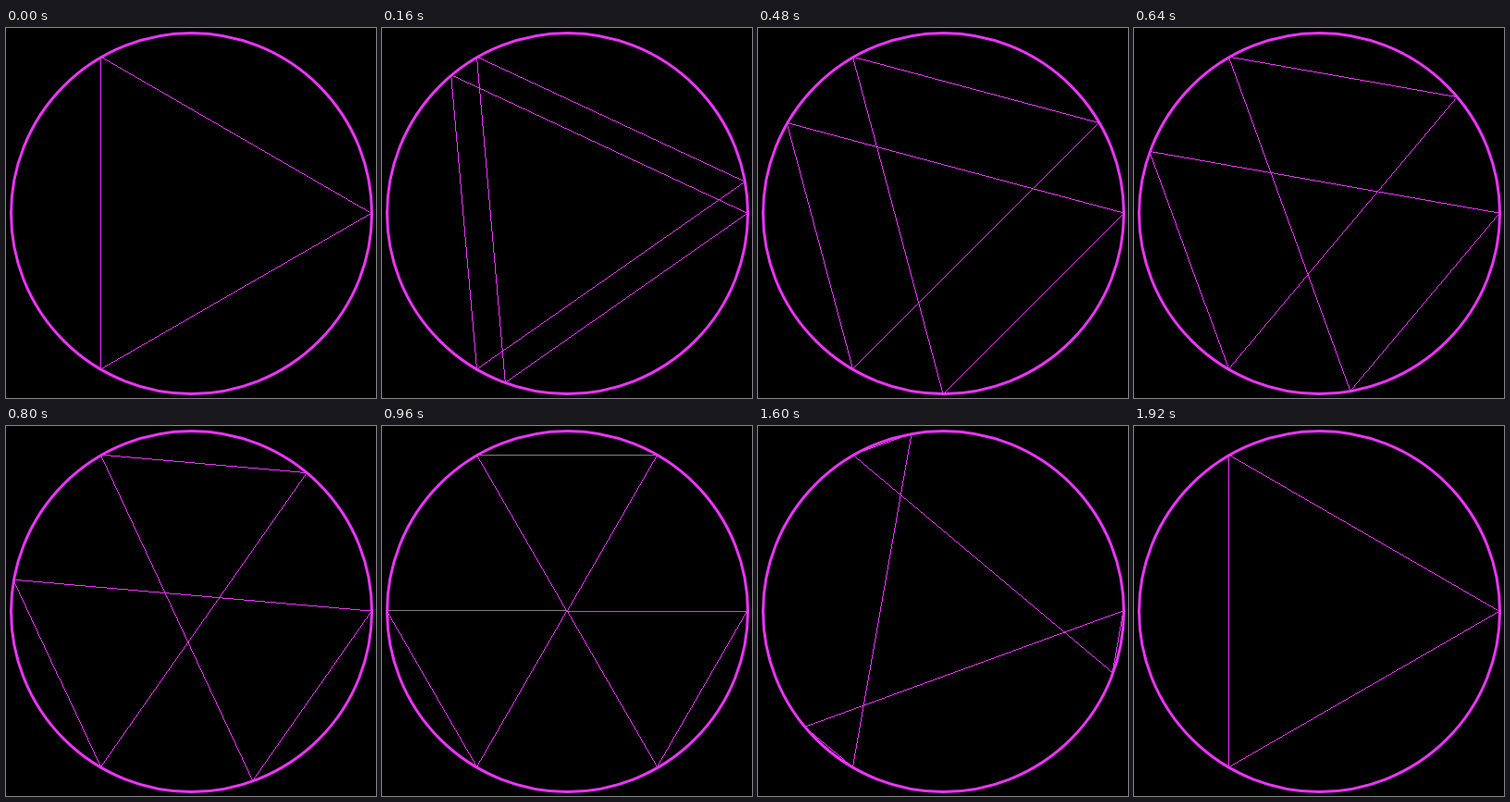
These frames come from a looping animation (400x400 px, 1960 ms). An HTML page with a canvas:

```html
<!DOCTYPE html>
<html lang="en">
<head>
<meta charset="utf-8">
<title>Turning triangle in a circle</title>
<style>
  html, body { margin: 0; width: 100%; height: 100%; overflow: hidden; background: #000; }
  canvas { display: block; }
</style>
</head>
<body>
<canvas id="stage" width="400" height="400"></canvas>
<script>
const ctx = document.getElementById('stage').getContext('2d');
const PINK = '#ec34fb', GREY = '#808080';
const STEP_MS = 40, STEPS = 49, STEP_DEG = 2.5;
const CENTER = 200, RADIUS = 195;

function rim(deg) {
  const a = deg * Math.PI / 180;
  return [CENTER + RADIUS * Math.cos(a), CENTER - RADIUS * Math.sin(a)];
}

// One-pixel line without smoothing; level lines above the middle are grey.
function chord([ax, ay], [bx, by]) {
  const dx = bx - ax, dy = by - ay;
  const n = Math.round(Math.max(Math.abs(dx), Math.abs(dy)));
  const level = Math.abs(dy) < 0.01;
  for (let i = 0; i <= n; i++) {
    const x = Math.floor(ax + dx * i / n + 1e-6);
    let y = Math.floor(ay + dy * i / n + 1e-6);
    if (level && y === CENTER && x < CENTER) y--;
    ctx.fillStyle = level && y < CENTER ? GREY : PINK;
    ctx.fillRect(x, y, 1, 1);
  }
}

function draw(step) {
  const turn = step * STEP_DEG;
  ctx.fillStyle = '#000';
  ctx.fillRect(0, 0, 400, 400);

  // Each moving corner joins the two fixed corners it is not named after.
  for (const base of [0, 120, 240]) {
    const corner = rim(base + turn);
    chord(rim(base + 120), corner);
    chord(corner, rim(base + 240));
  }

  ctx.strokeStyle = PINK;
  ctx.lineWidth = 3;
  ctx.beginPath();
  ctx.arc(CENTER + 0.5, CENTER + 0.5, RADIUS, 0, 2 * Math.PI);
  ctx.stroke();
}

const start = performance.now();
function tick() {
  const elapsed = performance.now() - start;
  draw(Math.floor(elapsed / STEP_MS) % STEPS);
  requestAnimationFrame(tick);
}
tick();
</script>
</body>
</html>
```
